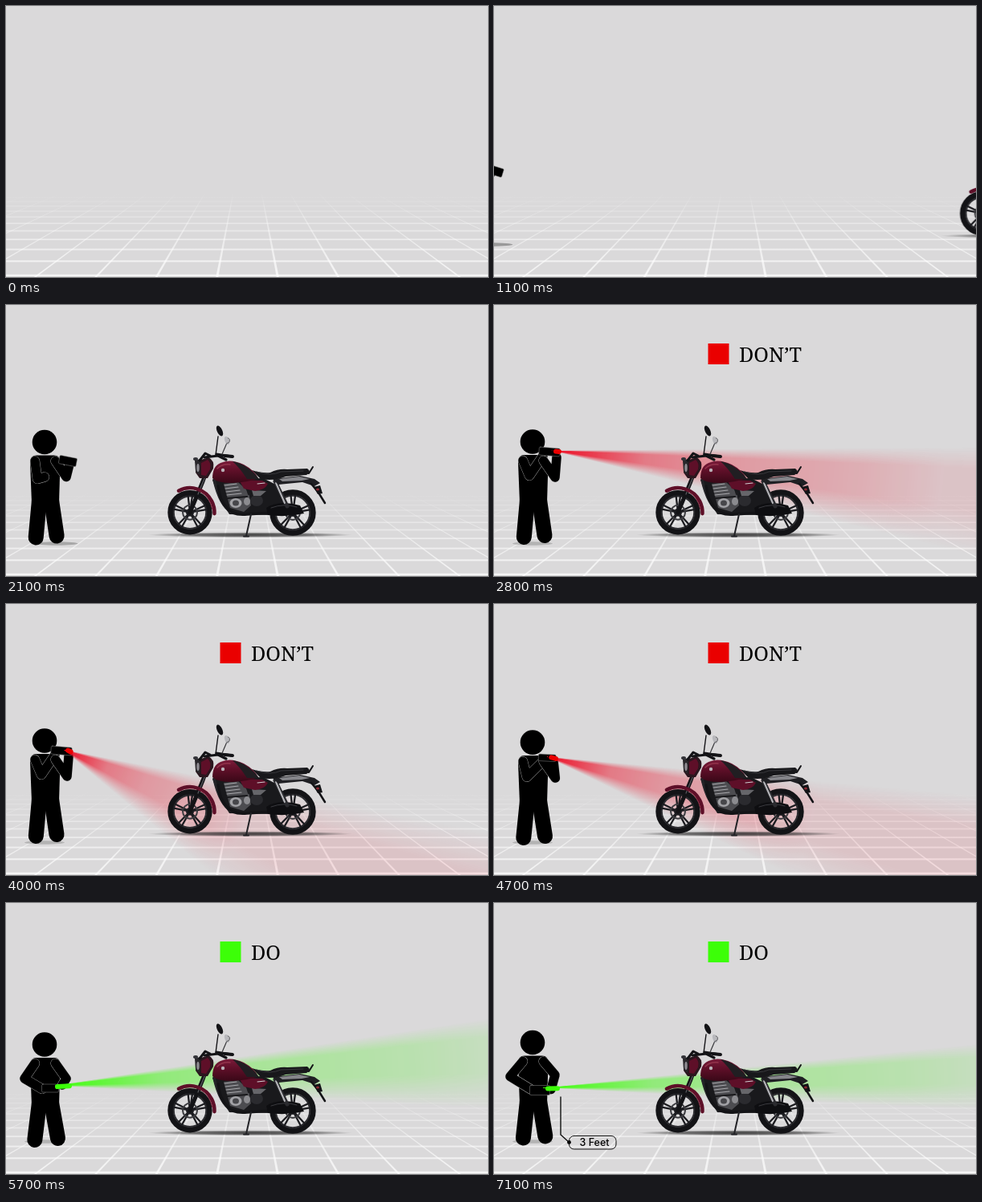
Animation of 600x338 px, one loop 8 s. Source, as an HTML page with a canvas:

```html
<!DOCTYPE html>
<html lang="en">
<head>
<meta charset="utf-8">
<title>Scanning a motorbike: do and don't</title>
<style>
html, body { margin: 0; width: 100%; height: 100%; overflow: hidden; background: #dad9da; }
canvas { display: block; width: 600px; height: 338px; }
</style>
</head>
<body>
<canvas id="stage" width="600" height="338"></canvas>
<script>
const W = 600, H = 338, LOOP = 8000, STEP = 100;
const RED = '#ea0000', GREEN = '#3cff08', MAROON = '#5e0f28', DARK = '#131316';
const stage = document.getElementById('stage').getContext('2d');
let g = stage;

const layer = () => {
  const c = document.createElement('canvas');
  c.width = W; c.height = H;
  return c.getContext('2d');
};
const clamp = v => Math.min(1, Math.max(0, v));
const ramp = (t, from, to) => clamp((t - from) / (to - from));
const ease = u => u * u * (3 - 2 * u);

// Blends the value lists of the two keys around t.
function at(keys, t) {
  let i = 0;
  while (i < keys.length - 2 && t >= keys[i + 1][0]) i++;
  const [t0, a] = keys[i], [t1, b] = keys[i + 1];
  const u = ease(ramp(t, t0, t1));
  return a.map((v, k) => v + (b[k] - v) * u);
}

function fill(d, color) {
  g.fillStyle = color;
  g.fill(new Path2D(d));
}
function line(d, color, width) {
  g.strokeStyle = color;
  g.lineWidth = width;
  g.lineCap = g.lineJoin = 'round';
  g.stroke(new Path2D(d));
}
function oval(x, y, rx, ry, color, turn = 0) {
  g.fillStyle = color;
  g.beginPath();
  g.ellipse(x, y, rx, ry, turn, 0, 7);
  g.fill();
}
function ring(x, y, r, color, width, from = 0, to = 7) {
  g.strokeStyle = color;
  g.lineWidth = width;
  g.beginPath();
  g.arc(x, y, r, from, to);
  g.stroke();
}

function drawFloor() {
  g.fillStyle = '#dad9da';
  g.fillRect(0, 0, W, H);
  const fade = g.createLinearGradient(0, 232, 0, H);
  fade.addColorStop(0, 'rgba(255,255,255,0)');
  fade.addColorStop(.35, 'rgba(255,255,255,.35)');
  fade.addColorStop(1, 'rgba(255,255,255,.75)');
  const eyeY = 141, gap = 75.5, depth = 197;
  for (let n = -13.5; n < 14; n++) {
    const x = y => 300.5 + n * gap * (y - eyeY) / depth;
    g.fillStyle = fade;
    g.beginPath();
    g.moveTo(x(232) - .5, 232);
    g.lineTo(x(232) + .5, 232);
    g.lineTo(x(H) + 1.5, H);
    g.lineTo(x(H) - 1.5, H);
    g.fill();
  }
  for (let i = 0; i < 12; i++) {
    const y = eyeY + 1 / (.00513 + .00051 * i), h = 2.2 - i * .12;
    g.fillRect(0, y - h / 2, W, h);
  }
}

function wheel(x, y, r) {
  ring(x, y, r - 3.5, DARK, 7);
  ring(x, y, r - 7.5, '#2c2c30', 2);
  for (let i = 0; i < 5; i++) {
    const a = i * Math.PI * .4 - .3;
    for (const s of [-.13, .13]) {
      const px = x + Math.cos(a + s) * (r - 7), py = y + Math.sin(a + s) * (r - 7);
      line(`M${x} ${y}L${px} ${py}`, '#1c1c20', 2.3);
    }
  }
  ring(x, y, 9, '#3b3b3f', 2);
  oval(x, y, 5, 5, '#1c1c20');
  oval(x, y, 1.5, 1.5, '#8b8b8f');
}

function drawBike() {
  const shade = g.createRadialGradient(0, 0, 0, 0, 0, 127);
  shade.addColorStop(0, 'rgba(25,25,25,.8)');
  shade.addColorStop(.6, 'rgba(45,45,45,.6)');
  shade.addColorStop(1, 'rgba(60,60,60,0)');
  g.save();
  g.translate(304, 286.7);
  g.scale(1, .026);
  oval(0, 0, 127, 127, shade);
  g.restore();

  wheel(357, 259, 28.7);
  wheel(229, 258.7, 27.7);

  // frame, engine and exhaust
  fill('M257 218L320 216L340 226L346 250L328 262L278 261L264 238Z', '#19191c');
  line('M259 218Q266 250 281 259', '#232327', 3.5);
  fill('M271 223L289 221L302 233L305 250L296 258L279 253Z', '#4c4c50');
  line('M272 225L287 223M273 229L289 227M274 233L291 231M275 237L293 235', '#aaaaae', 1.1);
  line('M276 241L300 239M298 224L302 236', '#19191c', 2);
  oval(286, 247, 7.5, 6, '#a2a2a6');
  oval(286, 247, 4, 3.5, '#47474b');
  oval(300, 245, 4, 5, '#8b8b8f');
  oval(312, 244, 8, 7, '#2b2b2f');
  fill('M306 231L324 232L317 238L308 238Z', '#66666a');
  line('M264 226Q266 244 274 252Q282 263 300 261L330 259', DARK, 3.5);
  fill('M324 253Q340 243 366 250L371 260Q350 265 326 262Z', '#0e0e11');
  line('M330 253Q346 247 362 252', '#3b3b40', 1);
  line('M305 261L299 288M296 288.5L302 288.5', '#222226', 2);

  // rear end
  line('M335 220L350 251', '#2b2b2f', 5);
  line('M336 222L347 247', '#b8b8bc', 1.9);
  fill('M332 217L366 213L384 217L391 222L384 226L369 221L339 224Z', '#1f1f23');
  fill('M340 217L365 214L378 217L368 219L344 220Z', '#85858a');
  line('M380 223L389 234L397 247', DARK, 2.5);
  fill('M383 227L391 225L394 235L388 236Z', DARK);
  oval(388, 230, 2, 1.6, '#8b2832');
  line('M361 206L377 210L382 202', DARK, 2);
  fill('M306 206Q319 210 329 209Q339 204 350 205L375 204Q381 208 374 212L348 214Q333 220 317 217Z', '#18181b');
  line('M312 208Q330 214 342 208L370 207', '#37373b', 1);

  // body panels
  fill('M290 218L319 219L326 223Q322 231 310 232L296 229Z', MAROON);
  line('M313 223L322 222', '#cfcfd2', 1.1);
  const paint = g.createLinearGradient(0, 194, 0, 222);
  paint.addColorStop(0, '#7b1c3a');
  paint.addColorStop(.45, MAROON);
  paint.addColorStop(1, '#390817');
  fill('M257 216Q257 201 267 197Q279 191 296 199Q309 206 314 216Q303 221 281 222Q263 222 257 216Z', paint);
  fill('M282 195Q300 198 315 217L300 217Q291 203 282 195Z', '#211e22');
  line('M263 204Q269 198 279 199', '#94344c', 1.5);
  oval(270, 206, 2.2, 2.2, '#b9b2b7');

  // fork, fender and lamp
  line('M253 198L245 220L229 259', DARK, 5);
  line('M248 214L239 236', '#55555a', 1.3);
  ring(229, 258.7, 30.5, MAROON, 4.5, -2.05, .05);
  line('M240 231Q253 237 257 255', '#7d2339', .9);
  fill('M237 195L252 190Q260 194 258 204L251 216L241 216L236 209Z', '#2b161e');
  fill('M243 197L251 193Q256 197 254 205L249 213L243 212Z', MAROON);
  fill('M235 194L242 192L241 212L236 208Z', '#29272b');
  oval(239, 203, 1.7, 5, '#8f8c92');
  line('M241 194L248 185L254 188', DARK, 3);
  oval(236, 192, 3, 2, '#333338');
  line('M247 190L264 188L274 193M262 186L281 189', DARK, 3.2);
  line('M272 188L282 189', DARK, 4);
  line('M261 187L264 164', DARK, 1.4);
  oval(266, 157, 3.2, 7, DARK, -.45);
  line('M269 186L275 172', '#38383c', 1.2);
  oval(275, 169, 2.6, 5.2, '#b8b8bc', -.35);
  ring(275, 169, 3.5, '#4b4b4f', .9, -1.2, 1.6);
}

const cached = paint => {
  const c = layer();
  g = c;
  paint();
  g = stage;
  return c.canvas;
};
const floor = cached(drawFloor);
const bike = cached(drawBike);

// drop, left elbow, left hand, right elbow, right hand, phone x y w h turn, tip x y length
const walking = [1, 34, 220, 35, 240, 74, 213, 80, 206, 85, 205, 18, 11, .3, 80, 205, 4];
const raised = [0, 44, 213, 61, 188, 76, 215, 78, 190, 69, 183, 26, 10, .08, 77, 182.5, 4];
const chest = [6, 35, 215, 62, 204, 77, 215, 67, 204, 61, 202, 14, 6, 0, 61, 201.5, 9];
const low = [6, 23, 213, 45, 226, 75, 213, 70, 221, 55, 225, 21, 10, 0, 64, 223, 15];
const settled = [3.5, 20, 213, 46, 229, 76, 211, 71, 229, 57, 230, 25, 12, 0, 67, 228, 12];
const poses = [[1900, walking], [2300, raised], [4500, raised], [5000, chest],
  [5300, chest], [5700, low], [6300, settled]];

// upper and lower edge of the beam in degrees
const aims = [[2300, [-.5, 14]], [2800, [-.5, 14]], [3100, [-2.6, 11.5]], [3900, [11, 40]],
  [4400, [11, 40]], [5000, [-.7, 12]], [5200, [-.7, 12]], [5450, [-9, 3]],
  [5700, [-8.8, 3]], [6300, [-5.8, 3]]];

const light = layer();
// The wider the beam spreads, the sooner it fades.
function drawBeam(x, y, [top, bottom], reach, color) {
  const clear = color + '00', spread = bottom - top, span = spread / 360;
  const cone = light.createConicGradient(top * Math.PI / 180, x, y);
  cone.addColorStop(0, clear);
  cone.addColorStop(span * .2, color);
  cone.addColorStop(span * .6, color);
  cone.addColorStop(span, clear);
  cone.addColorStop(1, clear);
  const radius = 570 * reach * Math.min(1, 12.5 / spread);
  const falloff = light.createRadialGradient(x, y, 0, x, y, radius);
  [[0, 1], [.08, .82], [.24, .46], [.45, .31], [.8, .2], [1, reach < 1 ? 0 : .1]]
    .forEach(([p, a]) => falloff.addColorStop(p, `rgba(0,0,0,${a})`));
  light.globalCompositeOperation = 'copy';
  light.fillStyle = cone;
  light.fillRect(0, 0, W, H);
  light.globalCompositeOperation = 'destination-in';
  light.fillStyle = falloff;
  light.fillRect(0, 0, W, H);
  g.drawImage(light.canvas, 0, 0);
}

function arm(sx, ex, ey, hx, hy) {
  const d = `M${sx} 194L${ex} ${ey}L${hx} ${hy}`;
  line(d, '#b4b4b4', 12.2);
  line(d, '#000', 11.4);
}

function drawPerson(pose, t) {
  const [drop, lx, ly, lhx, lhy, rx, ry, rhx, rhy, px, py, pw, ph, turn] = pose;
  const still = ramp(t, 1900, 2300), wide = drop / 4;
  oval(78 - 30 * still, 297.5, 28 - 3 * still, 2.2, `rgba(90,90,90,${.5 - .2 * still})`);
  g.save();
  g.translate(0, drop);
  oval(48, 170.5, 15.3, 15.3, '#000');
  fill('M38 187H60Q67.5 187 67.5 196L66 247H32L30 196Q30 187 38 187Z', '#000');
  line(`M41.5 243L${37.3 - wide} 289.5`, '#000', 19);
  line(`M56.5 243L${63 + wide} 287.5`, '#000', 19);
  arm(36, lx, ly, lhx, lhy);
  arm(61.5, rx, ry, rhx, rhy);
  g.translate(px, py);
  g.rotate(turn);
  g.fillStyle = '#000';
  g.strokeStyle = '#888';
  g.lineWidth = .5;
  g.beginPath();
  g.roundRect(-pw / 2, -ph / 2, pw, ph, 1.5);
  g.fill();
  g.stroke();
  g.restore();
}

function drawTitle(word, color) {
  g.fillStyle = color;
  g.fillRect(266.5, 48, 26, 26);
  g.fillStyle = '#000';
  g.font = '25.2px "Noto Serif", serif';
  g.fillText(word, 305, 70.5);
}

function drawLabel(t) {
  const drawn = ramp(t, 5800, 6100), open = ramp(t, 6050, 6400);
  if (!drawn) return;
  g.save();
  g.beginPath();
  g.rect(80, 240, 20, 62 * drawn);
  g.clip();
  line('M83 242V289L93 298', '#111', 1.4);
  oval(93.5, 298.5, 2.4, 2.4, '#000');
  g.restore();
  if (!open) return;
  g.save();
  g.beginPath();
  g.rect(90, 288, 64 * open, 22);
  g.clip();
  g.strokeStyle = '#111';
  g.lineWidth = 1;
  g.beginPath();
  g.roundRect(93.5, 290.5, 58.5, 16.5, 6);
  g.stroke();
  g.fillStyle = '#000';
  g.font = '500 12.5px Inter, sans-serif';
  g.fillText('3 Feet', 106.5, 303.2);
  g.restore();
}

function draw(t) {
  g.drawImage(floor, 0, 0);
  if (t < 1000) return;
  const away = 1 - ramp(t, 1000, 1900);
  const pose = at(poses, t);
  const good = t >= 5500, color = good ? GREEN : RED;
  const reach = ramp(t, 2250, 2600);
  const [tipX, tipY, tipLen] = pose.slice(14), y = tipY + pose[0];
  const aim = at(aims, t);

  g.save();
  g.translate(-93 * away, 0);
  drawPerson(pose, t);
  g.restore();
  if (reach) {
    drawBeam(tipX - 6, y - 1, aim, reach, good ? GREEN : '#ee0a22');
    const a = (aim[0] + aim[1]) * Math.PI / 360;
    line(`M${tipX} ${y}l${tipLen * Math.cos(a)} ${tipLen * Math.sin(a)}`, color, 6);
  }
  g.drawImage(bike, 426 * away, 0);

  if (good) {
    drawTitle('DO', color);
    drawLabel(t);
  } else {
    g.globalAlpha = ramp(t, 2100, 2500);
    drawTitle('DON’T', color);
    g.globalAlpha = 1;
  }
}

const start = performance.now();
function tick() {
  const t = (performance.now() - start) % LOOP;
  draw(Math.floor(t / STEP) * STEP);
  requestAnimationFrame(tick);
}
tick();
</script>
</body>
</html>
```
